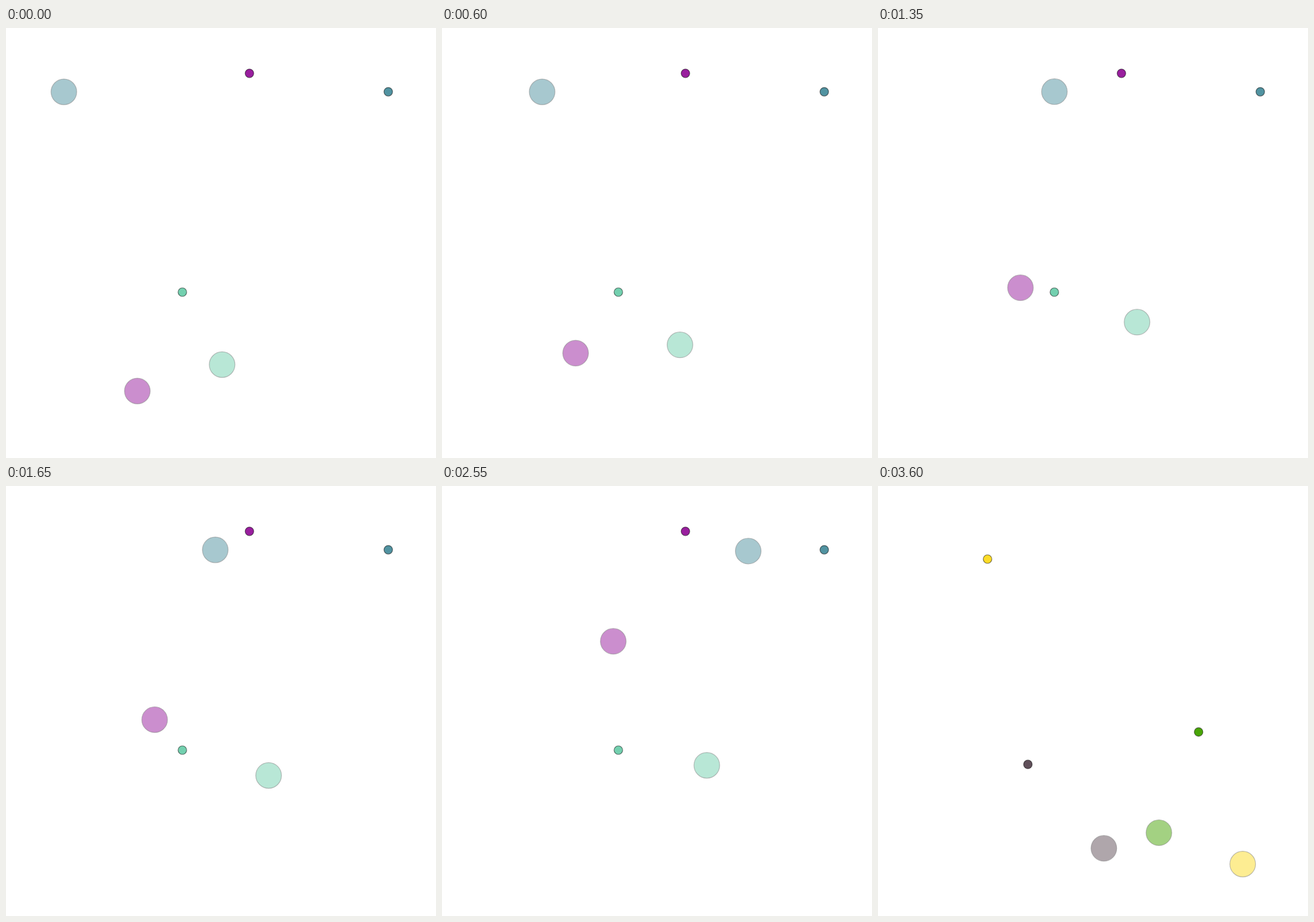
Recreate the animation shown at these times as an HTML page. Size 700x700 px, loop 3750 ms.

```html
<!DOCTYPE html>
<html lang="en">
<head>
<meta charset="utf-8">
<title>Seekers</title>
<style>
  html, body { margin: 0; height: 100%; overflow: hidden; background: #fff; }
  svg { display: block; width: 100vw; height: 100vh; }
  circle { stroke: rgba(0, 0, 0, .5); stroke-width: 1.2; }
  .seeker { opacity: .5; }
</style>
</head>
<body>
<svg viewBox="0 0 700 700"></svg>
<script>
const STEP = 150, CHASE_STEPS = 24;
const svg = document.querySelector('svg');

// Each seeker glides through a few way points, reached at these steps.
const knots = [0, 4, 9, 14, 17, 21, 23];

const chase = [
  { color: '#5193a1', goal: [622.3, 103.8],
    path: [[94.2, 104], [163, 104], [287.2, 103.6], [421.7, 104.8], [498.5, 105.9], [563, 109.7], [589, 112]] },
  { color: '#991f9e', goal: [396.3, 73.8],
    path: [[213.8, 591], [217.5, 529.3], [231.9, 422.8], [260, 316.8], [278.8, 252.8], [319.1, 189.8], [341, 166]] },
  { color: '#73d0af', goal: [287.1, 430],
    path: [[351.8, 548], [387.4, 515.8], [421.7, 478.8], [430.5, 463.8], [431.1, 454.7], [429.2, 447.3], [427, 435]] }
];

const restart = [
  { color: '#fddc28', goal: [178.3, 119], path: [[593.7, 615.5]] },
  { color: '#49a508', goal: [521.9, 400.4], path: [[457.3, 564.4]] },
  { color: '#61505a', goal: [244, 453.2], path: [[367.7, 589.8]] }
];

function add(parent, tag, attrs = {}) {
  const el = document.createElementNS('http://www.w3.org/2000/svg', tag);
  for (const key in attrs) el.setAttribute(key, attrs[key]);
  return parent.appendChild(el);
}

function place(el, [x, y]) {
  el.setAttribute('cx', x);
  el.setAttribute('cy', y);
}

function buildScene(actors) {
  const group = add(svg, 'g');
  for (const actor of actors) {
    const fill = actor.color;
    place(add(group, 'circle', { r: 7, fill }), actor.goal);
    actor.el = add(group, 'circle', { r: 20.9, fill, class: 'seeker' });
    place(actor.el, actor.path[0]);
  }
  return group;
}

// Cubic Hermite curve with parabolic tangents on uneven knots.
function glide(values, step) {
  const end = knots.length - 1;
  const gap = k => knots[k + 1] - knots[k];
  const rate = k => (values[k + 1] - values[k]) / gap(k);
  const slope = k => {
    if (k === 0) return 2 * rate(0) - slope(1);
    if (k === end) return 2 * rate(end - 1) - slope(end - 1);
    return (rate(k - 1) * gap(k) + rate(k) * gap(k - 1)) / (gap(k) + gap(k - 1));
  };
  let i = 0;
  while (i < end - 1 && knots[i + 1] <= step) i++;
  const u = (step - knots[i]) / gap(i), v = 1 - u;
  const bend = v * (slope(i) - rate(i)) - u * (slope(i + 1) - rate(i));
  return v * values[i] + u * values[i + 1] + gap(i) * u * v * bend;
}

const chaseScene = buildScene(chase);
const restartScene = buildScene(restart);

const start = performance.now();
function draw(now) {
  const step = Math.floor(Math.max(0, now - start) / STEP) % (CHASE_STEPS + 1);
  const chasing = step < CHASE_STEPS;
  chaseScene.style.display = chasing ? '' : 'none';
  restartScene.style.display = chasing ? 'none' : '';
  if (chasing) {
    for (const { el, path } of chase) {
      place(el, [0, 1].map(axis => glide(path.map(point => point[axis]), step)));
    }
  }
  requestAnimationFrame(draw);
}
draw(start);
</script>
</body>
</html>
```
